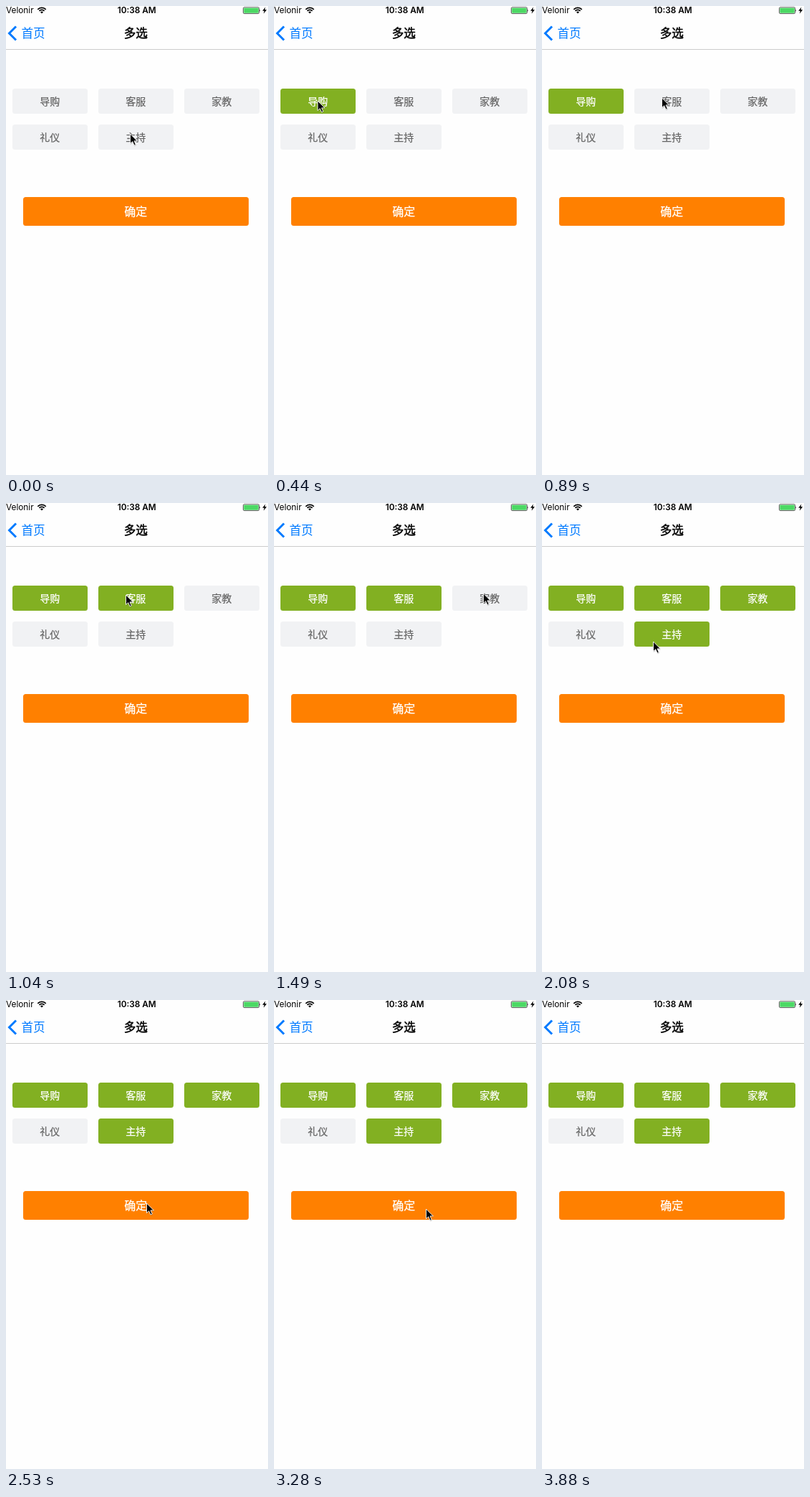
Animation of 366 by 653 pixels, one loop 4.37 s. Source, as an HTML page:

```html
<!DOCTYPE html>
<html lang="zh-CN">
<head>
<meta charset="utf-8">
<title>多选</title>
<style>
  html, body { margin: 0; width: 100%; height: 100%; overflow: hidden; background: #fefefe; }
  svg { display: block; }
  text { font-family: Inter, "Noto Sans CJK SC", "Noto Sans CJK", sans-serif; }
  .mid { text-anchor: middle; }
  .label { font-size: 14px; font-weight: 500; fill: #666; stroke: #666; stroke-width: .25px; }
  .tag rect { fill: #f1f2f4; }
  .on rect { fill: #82b022; }
  .on .label { fill: #fff; stroke: #fff; }
</style>
</head>
<body>
<svg width="366" height="653" viewBox="0 0 366 653">
  <text x="0" y="10.4" font-size="11.8">Velonir</text>
  <path d="M44.3 4.8A8 8 0 0 1 55.7 4.8M46.4 6.9A5.1 5.1 0 0 1 53.6 6.9" fill="none" stroke="#000" stroke-width="1.7"/>
  <path d="M50 10.6L48 8.6A2.8 2.8 0 0 1 52 8.6Z"/>
  <text class="mid" x="182.7" y="10.4" font-size="11.8" font-weight="600">10:38 AM</text>
  <rect x="331.4" y="1.8" width="22.2" height="8.8" rx="1.5" fill="none" stroke="#333" stroke-width=".8"/>
  <rect x="332.3" y="2.7" width="20.4" height="7" rx=".6" fill="#4cd964"/>
  <path d="M354.4 4.4q1.6 1.8 0 3.6z" fill="#222"/>
  <path d="M362.4 1.5L358.2 6.8H360.8L359.8 10.7L364.2 5.2H361.5Z"/>

  <path d="M14 28.5L4.5 38L14 47.5" fill="none" stroke="#007aff" stroke-width="3"/>
  <text x="21.5" y="44" font-size="16.6" fill="#007aff">首页</text>
  <text class="mid" x="181.3" y="44" font-size="16.6" font-weight="500" stroke="#000" stroke-width=".45">多选</text>
  <path d="M0 60.5H366" stroke="#ccc"/>

  <g id="tags"></g>
  <rect x="24" y="266" width="315" height="40" rx="3.5" fill="#ff8000"/>
  <text class="mid" x="181.3" y="292" font-size="16" font-weight="500" fill="#fff" stroke="#fff" stroke-width=".25">确定</text>

  <g id="cursor">
    <path d="M.8 2V16L4 13.2L6.4 18.2L9 17L6.8 12.2H11Z" opacity=".22"/>
    <path d="M.5 1V14.6L3.7 11.7L6.1 17L8.3 16L6 10.9H10.4Z" stroke="#fff" stroke-width=".9"/>
  </g>
</svg>
<script>
const LOOP = 4370, TICK = 150, LEAD = 20;
const NAMES = ["导购", "客服", "家教", "礼仪", "主持"];

// Where the pointer rests; arrive and leave are counted in ticks
const STOPS = [
  { x: 173, y: 177, arrive: 0, leave: 0 },
  { x: 60.5, y: 131, arrive: 2, leave: 3, tap: "导购" },
  { x: 167, y: 127, arrive: 6, leave: 8, tap: "客服" },
  { x: 292, y: 125, arrive: 9.5, leave: 11, tap: "家教" },
  { x: 155, y: 192, arrive: 13, leave: 15, tap: "主持" },
  { x: 196, y: 282, arrive: 17, leave: 19 },
  { x: 213, y: 186, arrive: 20, leave: 20.3 },
  { x: 212, y: 290, arrive: 22, leave: 23 },
  { x: 295, y: 576, arrive: 24.5, leave: 26 }
];

const ease = u => u < .5 ? 4 * u ** 3 : 1 - 4 * (1 - u) ** 3;

function pointerAt(tick) {
  const i = STOPS.findLastIndex(stop => stop.arrive <= tick);
  const from = STOPS[i], to = STOPS[i + 1] || from;
  if (tick <= from.leave || to === from) return from;
  const u = ease((tick - from.leave) / (to.arrive - from.leave));
  return { x: from.x + (to.x - from.x) * u, y: from.y + (to.y - from.y) * u };
}

const cursor = document.getElementById("cursor");
const group = document.getElementById("tags");
group.innerHTML = NAMES.map((name, i) => {
  const x = 9 + 120 * (i % 3), y = 115 + 50 * Math.floor(i / 3);
  return `<g class="tag"><rect x="${x}" y="${y}" width="105" height="35" rx="3.5"/>
    <text class="label mid" x="${x + 52.3}" y="${y + 22.5}">${name}</text></g>`;
}).join("");
const tags = [...group.children];

function draw() {
  // The screen refreshes once per tick
  const tick = Math.floor((performance.now() % LOOP + LEAD) / TICK);
  tags.forEach((tag, i) => {
    const stop = STOPS.find(s => s.tap === NAMES[i]);
    tag.classList.toggle("on", !!stop && tick > Math.ceil(stop.arrive));
  });
  const { x, y } = pointerAt(tick);
  cursor.setAttribute("transform", `translate(${x} ${y})`);
  cursor.setAttribute("visibility", tick < STOPS.at(-1).leave ? "visible" : "hidden");
  requestAnimationFrame(draw);
}
draw();
</script>
</body>
</html>
```
